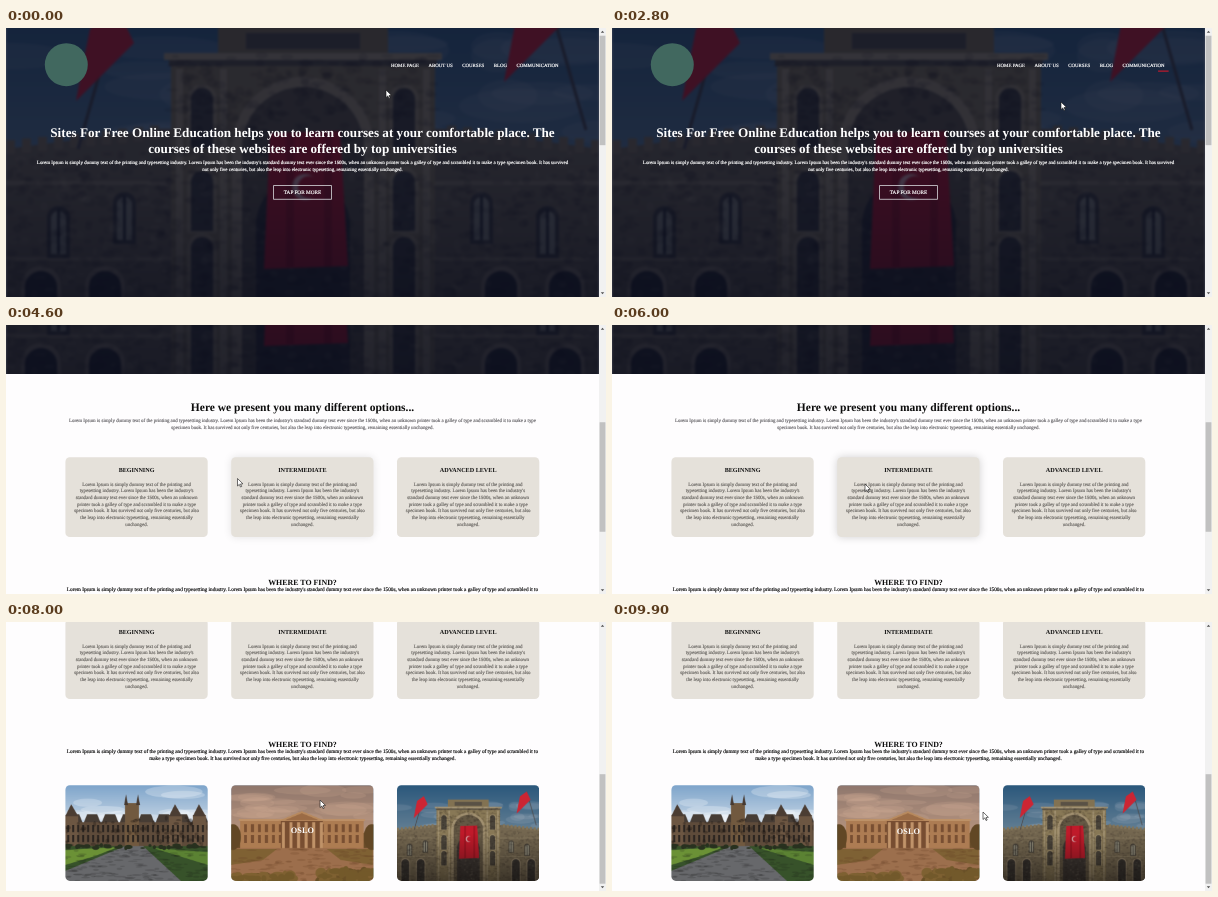
Write an HTML page with a canvas that moves like this. It is 600x269 px and loops after 10000 ms.

```html
<!DOCTYPE html>
<html lang="en">
<head>
<meta charset="utf-8">
<title>Online education page</title>
<style>
  html, body { margin: 0; width: 100%; height: 100%; overflow: hidden; background: #fff; }
  canvas { display: block; }
</style>
</head>
<body>
<canvas id="stage" width="600" height="269"></canvas>
<script>
let ctx = document.getElementById('stage').getContext('2d');
const LOOP = 10000, FRAME = 100, VIEW_W = 593, VIEW_H = 269, PAGE_H = 624, MID = 296.5;
const COLUMN_W = 142.3, CARD_TOP = 352.3, CARD_H = 79.8, PHOTO_TOP = 518.3, PHOTO_H = 95.6;
const NAV_SIZE = 4.93, SMALL = 4.95, FADE = 150, NOTCH = 44;
const LOREM = "Lorem Ipsum is simply dummy text of the printing and typesetting industry. " +
  "Lorem Ipsum has been the industry's standard dummy text ever since the 1500s, when an unknown printer " +
  "took a galley of type and scrambled it to make a type specimen book. It has survived not only five " +
  "centuries, but also the leap into electronic typesetting, remaining essentially unchanged.";

// Pointer stops: time, x, y.
const STOPS = [
  [0, 380, 62], [400, 398, 39], [2590, 526, 41], [2800, 449, 74], [4100, 332, 147], [5100, 131, 160],
  [6000, 253, 159], [6600, 455, 165], [7100, 416, 164], [8760, 228, 190], [8800, 207, 189],
  [9100, 150, 200], [9900, 371, 190]
];
// Bursts of the mouse wheel: start, notches.
const WHEEL = [[3700, 2], [4350, 3], [6860, 4]];

const clamp = v => Math.max(0, Math.min(1, v));
const smooth = u => u * u * (3 - 2 * u);
const lerp = (a, b, u) => a + (b - a) * u;
const columnX = i => 59.4 + i * 165.8;

let seed = 1;
function random() {
  seed = seed * 16807 % 2147483647;
  return seed / 2147483647;
}

function pointerAt(t) {
  const i = Math.max(1, STOPS.findIndex(stop => stop[0] > t));
  const [a, b] = t >= 9900 ? [STOPS.at(-1), STOPS.at(-1)] : [STOPS[i - 1], STOPS[i]];
  const u = a === b ? 0 : (t - a[0]) / (b[0] - a[0]);
  return [lerp(a[1], b[1], u), lerp(a[2], b[2], u)];
}

function scrollAt(t) {
  let y = 0;
  for (const [start, notches] of WHEEL)
    for (let i = 0; i < notches; i++) y += NOTCH * smooth(clamp((t - start - i * 40) / 110));
  return Math.min(y, PAGE_H - VIEW_H);
}

// How far a page box has faded into its hover state at time t.
function hoverAt(t, x, y, w, h) {
  const dt = 5, gain = 1 - Math.exp(-dt / FADE);
  let level = 0;
  for (let s = Math.max(0, t - 1500); s < t; s += dt) {
    const [px, py] = pointerAt(s), dx = px - x, dy = py + scrollAt(s) - y;
    const inside = dx > 0 && dx < w && dy > 0 && dy < h;
    level += ((inside ? 1 : 0) - level) * gain;
  }
  return smooth(level);
}

function rect(color, x, y, w, h) { ctx.fillStyle = color; ctx.fillRect(x, y, w, h); }

function poly(color, ...p) {
  ctx.fillStyle = color;
  ctx.beginPath();
  for (let i = 0; i < p.length; i += 2) ctx.lineTo(p[i], p[i + 1]);
  ctx.fill();
}

function blob(color, x, y, rx, ry = rx) {
  ctx.fillStyle = color;
  ctx.beginPath();
  ctx.ellipse(x, y, rx, ry, 0, 0, 7);
  ctx.fill();
}

function arch(color, x, y, w, h) {
  ctx.fillStyle = color;
  ctx.beginPath();
  ctx.arc(x + w / 2, y + w / 2, w / 2, Math.PI, 0);
  ctx.lineTo(x + w, y + h);
  ctx.lineTo(x, y + h);
  ctx.fill();
}

function shade(x, y, w, h, top, bottom) {
  const g = ctx.createLinearGradient(0, y, 0, y + h);
  g.addColorStop(0, top);
  g.addColorStop(1, bottom);
  rect(g, x, y, w, h);
}

function scatter(count, color, x, y, w, h, rx, ry) {
  for (let i = 0; i < count; i++)
    blob(color, x + random() * w, y + random() * h, rx * (0.5 + random()), ry * (0.5 + random()));
}

function mirrored(axis, paint) {
  paint();
  ctx.save();
  ctx.translate(axis * 2, 0);
  ctx.scale(-1, 1);
  paint();
  ctx.restore();
}

function picture(w, h, scale, paint) {
  const canvas = document.createElement('canvas'), stage = ctx;
  canvas.width = Math.ceil(w * scale);
  canvas.height = Math.ceil(h * scale);
  ctx = canvas.getContext('2d');
  ctx.scale(scale, scale);
  paint();
  ctx = stage;
  return canvas;
}

function text(str, x, y, size, color, bold, align = 'center') {
  ctx.font = `${bold ? 'bold ' : ''}${size}px "Liberation Serif", serif`;
  ctx.textAlign = align;
  ctx.fillStyle = ctx.strokeStyle = color;
  ctx.fillText(str, x, y);
  if (size < 6) {
    ctx.lineWidth = 0.18;
    ctx.strokeText(str, x, y);
  }
}

function paragraph(x, y, width, size, color) {
  ctx.font = `${size}px "Liberation Serif", serif`;
  let line = '';
  for (const word of LOREM.split(' ')) {
    const longer = line ? line + ' ' + word : word;
    if (ctx.measureText(longer).width > width) {
      text(line, x, y, size, color);
      y += 6.65;
      line = word;
    } else line = longer;
  }
  text(line, x, y, size, color);
}

// One half of the stone gate and its tower; the other half is its reflection.
function gateHalf() {
  poly('#746750', 0, 186, 150, 166, 172, 166, 172, 399, 0, 399);
  for (let x = 0; x < 150; x += 16) rect('#827459', x, 177 - x * 0.1, 9, 14);
  for (const y of [218, 294]) rect('#8a7c61', 0, y, 165, 4);
  rect('#887856', 165, 92, 135, 307);
  rect('#827252', 212, 60, 88, 34);
  rect('#595145', 240, 70, 60, 16);
  rect('#a89878', 158, 90, 142, 7);
  rect('#5d5444', 163, 97, 137, 6);
  for (const x of [170, 214]) rect('#a09070', x, 106, 7, 293);
  for (const y of [125, 208, 274]) {
    arch('#9a8a69', 181, y - 4, 30, 66);
    arch('#4a443a', 185, y, 22, 60);
  }
  for (let i = 0; i < 2; i++) {
    const x = 43 + i * 66, y = 246 - i * 14;
    arch('#4c463c', x - 2, y - 3, 23, 52);
    arch('#8d8978', x + 2, y + 2, 15, 43);
    rect('#3c3935', x + 8, y, 3, 46);
    arch('#93836a', 15 + i * 64, 303, 40, 96);
    arch('#37332f', 19 + i * 64, 308, 32, 91);
  }
}

function banner(x, y, lean) {
  ctx.strokeStyle = '#4c4848';
  ctx.lineWidth = 3;
  ctx.beginPath();
  ctx.moveTo(x, y);
  ctx.lineTo(x + lean, y + 140);
  ctx.stroke();
  poly('#cc2533', x, y, x + 16, y + 34, x - 12, y + 62, x - 42, y + 92, x - 34, y + 50, x - 28, y + 20);
}

function gate() {
  shade(0, 0, 593, 300, '#2b587c', '#8496a2');
  scatter(26, 'rgba(200,205,210,.12)', 0, 80, 593, 100, 50, 14);
  mirrored(297, gateHalf);
  arch('#a19070', 226, 114, 142, 285);
  arch('#645844', 236, 124, 122, 275);
  arch('#3c3632', 250, 215, 94, 184);
  scatter(900, 'rgba(25,20,15,.12)', 0, 190, 593, 209, 5, 3);
  scatter(300, 'rgba(25,20,15,.12)', 165, 92, 264, 100, 5, 3);
  scatter(350, 'rgba(235,215,175,.08)', 0, 190, 593, 209, 4, 3);
  poly('#c01a2a', 264, 170, 334, 168, 342, 303, 258, 306);
  blob('#dda2a6', 299, 224, 13);
  blob('#c01a2a', 303, 224, 11);
  for (const x of [280, 318]) rect('rgba(90,0,10,.25)', x, 170, 8, 134);
  banner(540, 27, 40);
  banner(112, 46, -40);
  shade(0, 200, 593, 199, 'rgba(15,12,10,0)', 'rgba(15,12,10,.55)');
}

function college() {
  shade(0, 0, 143, 60, '#7ea5cb', '#f4f4f5');
  scatter(14, 'rgba(255,255,255,.25)', 0, 5, 143, 30, 22, 5);
  for (let x = 0; x < 143; x += 18) {
    poly('#463c34', x, 39, x + 4, 29, x + 14, 29, x + 18, 39);
    rect('#5e4b3a', x, 37, 18, 25);
  }
  for (const x of [0, 104, 128]) {
    rect('#6c5642', x, 30, 13, 32);
    poly('#4b3d33', x, 31, x + 6, 19, x + 13, 31);
  }
  rect('#71593f', 60, 18, 14, 44);
  for (const x of [61, 73]) poly('#453931', x - 2, 20, x, 9, x + 2, 20);
  for (let x = 2; x < 142; x += 5)
    for (const y of [40, 50]) rect('#2a2420', x, y, 2, 7);
  rect('#37522a', 0, 61, 143, 35);
  poly('#6b9136', 0, 65, 53, 62, 30, 71, 0, 80);
  poly('#5b8233', 88, 63, 143, 67, 143, 80);
  poly('#67686b', 60, 61, 78, 61, 116, 96, 0, 96, 0, 86);
  scatter(160, 'rgba(20,20,20,.16)', 0, 64, 143, 32, 4, 0.8);
  scatter(60, 'rgba(25,20,15,.3)', 0, 32, 143, 28, 2, 2);
  scatter(40, '#28311f', 0, 60, 143, 3, 3, 1.5);
}

function hall() {
  shade(0, 0, 143, 60, '#7f91a3', '#d3cfc7');
  scatter(22, 'rgba(235,232,226,.22)', 0, 2, 143, 32, 20, 5);
  rect('#3a452b', 0, 48, 143, 18);
  rect('#b39a74', 9, 36, 124, 27);
  rect('#d0bd97', 8, 34, 126, 2);
  for (let x = 13; x < 130; x += 7)
    for (const y of [39, 50]) rect('#574a3b', x, y, 3, 8);
  rect('#55483a', 50, 36, 42, 27);
  for (let x = 51; x < 92; x += 7.6) rect('#d6c39d', x, 37, 3, 26);
  poly('#c6b188', 47, 36, 71, 26, 95, 36);
  poly('#947d5e', 54, 35, 71, 28, 88, 35);
  rect('#96826a', 0, 63, 143, 33);
  mirrored(71, () => poly('#626a3f', 0, 64, 46, 64, 32, 75, 0, 80));
  scatter(120, 'rgba(45,40,28,.2)', 0, 64, 143, 32, 4, 1);
  for (const color of ['#3c4c28', '#626a3b', '#4d5c2f']) {
    scatter(18, color, 0, 90, 60, 6, 5, 3);
    scatter(18, color, 88, 86, 55, 10, 5, 4);
  }
  for (const x of [2, 141]) blob('#2f3d25', x, 52, 8, 13);
}

const gatePicture = picture(593, 399, 1, gate);
const PHOTOS = [
  { image: picture(143, 96, 3, college) },
  { image: picture(143, 96, 3, hall), label: 'OSLO' },
  { image: gatePicture }
];

function hero(t) {
  ctx.save();
  ctx.beginPath();
  ctx.rect(0, 0, VIEW_W, VIEW_H);
  ctx.clip();
  ctx.filter = 'blur(1.2px)';
  ctx.drawImage(gatePicture, 0, -65);
  ctx.restore();
  rect('rgba(4,9,30,.7)', 0, 0, VIEW_W, VIEW_H);
  blob('#41685f', 60.3, 36.7, 21.5);

  let x = 385;
  for (const label of ['HOME PAGE', 'ABOUT US', 'COURSES', 'BLOG', 'COMMUNICATION']) {
    text(label, x, 38.9, NAV_SIZE, '#fff', false, 'left');
    const width = ctx.measureText(label).width, box = width + 8;
    const line = box * hoverAt(t, x - 4, 30, box, 17);
    rect('#e0182a', x + width + 4 - line, 42.6, line, 1);
    x += width + 9.4;
  }

  text('Sites For Free Online Education helps you to learn courses at your comfortable place. The', MID, 109.4, 13.17, '#fff', true);
  text('courses of these websites are offered by top universities', MID, 124.6, 13.17, '#fff', true);
  paragraph(MID, 135.9, 534, 4.97, '#fff');
  ctx.strokeStyle = '#d8d8dc';
  ctx.lineWidth = 0.8;
  ctx.strokeRect(267.5, 157.5, 58, 13.8);
  text('TAP FOR MORE', MID, 165.9, 5.27, '#fff');
}

function card(t, label, i) {
  const x = columnX(i), mid = x + COLUMN_W / 2;
  ctx.save();
  ctx.shadowColor = `rgba(0,0,0,${0.22 * hoverAt(t, x, CARD_TOP, COLUMN_W, CARD_H)})`;
  ctx.shadowBlur = 8.8;
  ctx.fillStyle = '#e5e1da';
  ctx.beginPath();
  ctx.roundRect(x, CARD_TOP, COLUMN_W, CARD_H, 4.4);
  ctx.fill();
  ctx.restore();
  text(label, mid, 367.4, 6.15, '#111', true);
  paragraph(mid, 380.8, 129, SMALL, '#6e6b67');
}

function photo(t, { image, label }, i) {
  const x = columnX(i), amount = hoverAt(t, x, PHOTO_TOP, COLUMN_W, PHOTO_H);
  ctx.save();
  ctx.translate(x, PHOTO_TOP);
  ctx.beginPath();
  ctx.roundRect(0, 0, COLUMN_W, PHOTO_H, 4.4);
  ctx.clip();
  ctx.imageSmoothingQuality = 'high';
  ctx.drawImage(image, 0, 0, COLUMN_W, PHOTO_H);
  rect(`rgba(165,85,38,${0.44 * amount})`, 0, 0, COLUMN_W, PHOTO_H);
  if (label) {
    ctx.globalAlpha = amount;
    text(label, COLUMN_W / 2, lerp(95, 47.3, amount), 8.3, '#fff', true);
  }
  ctx.restore();
}

function scrollbar(scroll) {
  const scale = 254 / PAGE_H;
  rect('#f1f1f1', VIEW_W, 0, 7, VIEW_H);
  rect('#c1c1c1', VIEW_W + 0.6, 7.7 + scroll * scale, 5.8, VIEW_H * scale);
  poly('#505050', 594.8, 4.8, 598.2, 4.8, 596.5, 2.8);
  poly('#505050', 594.8, 264.2, 598.2, 264.2, 596.5, 266.2);
}

function pointer(x, y) {
  ctx.save();
  ctx.translate(x, y);
  poly('#fff', 0, 0, 0, 7.5, 1.8, 5.9, 3, 8.5, 4.2, 8, 3, 5.5, 5.4, 5.3);
  ctx.closePath();
  ctx.strokeStyle = '#111';
  ctx.lineWidth = 0.6;
  ctx.stroke();
  ctx.restore();
}

function draw(now) {
  const t = Math.floor(now % LOOP / FRAME) * FRAME, scroll = scrollAt(t);
  rect('#fefdfe', 0, 0, 600, VIEW_H);
  ctx.save();
  ctx.translate(0, -scroll);
  hero(t);
  text('Here we present you many different options...', MID, 305.9, 11.5, '#0c0c0c', true);
  paragraph(MID, 317.2, 476, SMALL, '#6e6c70');
  ['BEGINNING', 'INTERMEDIATE', 'ADVANCED LEVEL'].forEach((label, i) => card(t, label, i));
  text('WHERE TO FIND?', MID, 479.8, 7.9, '#0c0c0c', true);
  paragraph(MID, 486.3, 476, 5.27, '#111');
  PHOTOS.forEach((item, i) => photo(t, item, i));
  ctx.restore();
  scrollbar(scroll);
  pointer(...pointerAt(t));
}

ctx.textRendering = 'geometricPrecision';
ctx.lineJoin = 'round';
const start = performance.now();
function tick() {
  draw(performance.now() - start);
  requestAnimationFrame(tick);
}
tick();
</script>
</body>
</html>
```
